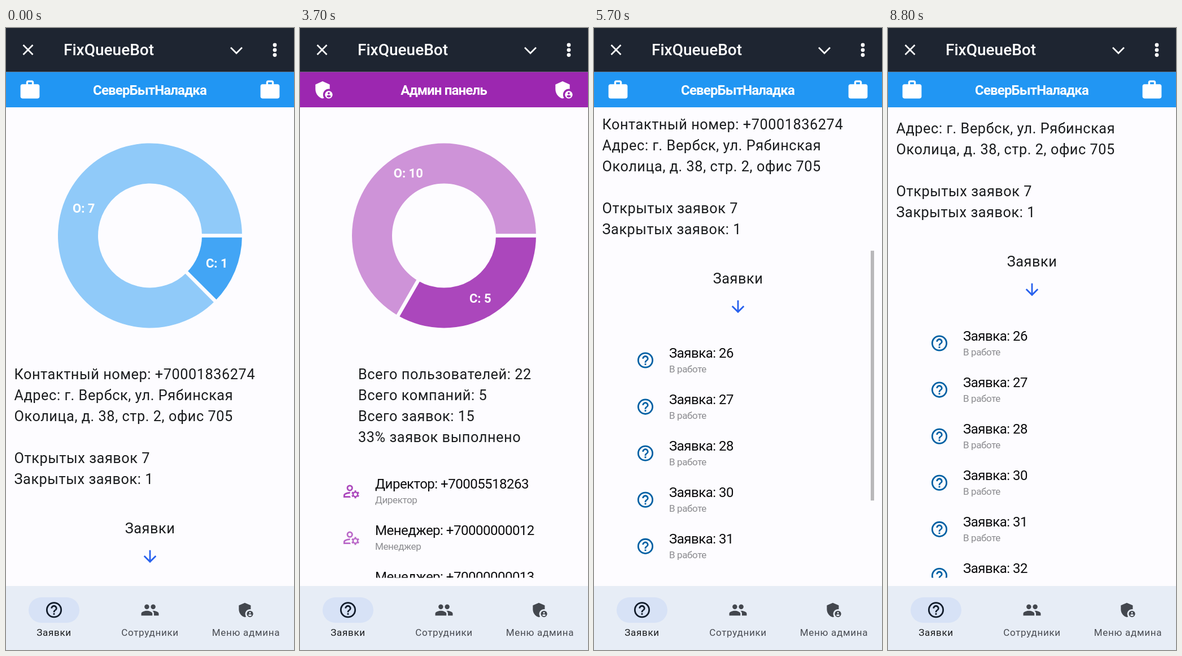
These frames come from a looping animation (510x1098 px, 9.2 s). An HTML page:

```html
<!DOCTYPE html>
<html lang="ru">
<head>
<meta charset="utf-8">
<title>FixQueueBot</title>
<style>
  html, body { margin: 0; height: 100%; overflow: hidden; background: #fdfcff; }
  svg { display: block; }
  #stage { width: 100vw; height: 100vh; }
  text { font-family: Roboto, sans-serif; white-space: pre; }
  .body { font-size: 25.3px; letter-spacing: .55px; fill: #1a1c1e; }
  .title { font-size: 24px; letter-spacing: -.5px; fill: #0c0c0e; }
  .sub { font-size: 17px; letter-spacing: -.38px; fill: #8c8c90; }
  .head { font-size: 24px; font-weight: 600; letter-spacing: -.85px; fill: #fff; }
  .slice { font-size: 22px; font-weight: 600; fill: #fff; }
  .bot { font-size: 28px; font-weight: 500; fill: #fff; }
  .detail { font-size: 22.5px; letter-spacing: .35px; fill: #1f2226; }
  .tab { color: #43474e; }
  .tab text { font-size: 17px; letter-spacing: .7px; fill: #484b52; }
  .tab.on { color: #111c2b; }
  .tab.on text { fill: #1a1c1e; }
  .mid { text-anchor: middle; }
</style>
</head>
<body>
<svg id="stage" viewBox="0 0 510 1098" preserveAspectRatio="none">
  <defs>
    <clipPath id="view"><rect y="154.5" width="510" height="816"/></clipPath>
    <symbol id="work" viewBox="0 0 24 24"><path fill="currentColor" d="M20 6h-4V4c0-1.1-.9-2-2-2h-4c-1.1 0-2 .9-2 2v2H4c-1.1 0-2 .9-2 2v11c0 1.1.9 2 2 2h16c1.1 0 2-.9 2-2V8c0-1.1-.9-2-2-2zm-6 0h-4V4h4z"/></symbol>
    <symbol id="help" viewBox="0 0 24 24">
      <circle cx="12" cy="12" r="9" fill="none" stroke="currentColor" stroke-width="2"/>
      <path fill="currentColor" d="M11 16h2v2h-2zM12 6c-2.2 0-4 1.8-4 4h2c0-1.1.9-2 2-2s2 .9 2 2c0 2-3 1.75-3 5h2c0-2.25 3-2.5 3-5 0-2.2-1.8-4-4-4z"/>
    </symbol>
    <symbol id="people" viewBox="0 0 24 24"><g fill="currentColor">
      <circle cx="8" cy="8" r="3"/><circle cx="16" cy="8" r="3"/>
      <path d="M8 13c-2.33 0-7 1.17-7 3.5V19h14v-2.5c0-2.33-4.67-3.5-7-3.5zM16 13c-.3 0-.6 0-1 .05 1.2.84 2 1.97 2 3.45V19h6v-2.5c0-2.33-4.67-3.5-7-3.5z"/>
    </g></symbol>
    <symbol id="admin" viewBox="0 0 24 24"><path fill="currentColor" fill-rule="evenodd" d="M17 11c.34 0 .67.04 1 .09V6.27L10.5 3 3 6.27v4.91c0 4.54 3.2 8.79 7.5 9.82.55-.13 1.08-.32 1.6-.55C11.4 19.5 11 18.3 11 17c0-3.3 2.7-6 6-6zM17 13a4 4 0 1 0 0 8 4 4 0 0 0 0-8zm0 1.38a1.12 1.12 0 1 1 0 2.24 1.12 1.12 0 0 1 0-2.24zm0 5.37c-.93 0-1.74-.46-2.24-1.17.05-.72 1.5-1.08 2.24-1.08s2.2.36 2.24 1.08c-.5.71-1.3 1.17-2.24 1.17z"/></symbol>
    <symbol id="manager" viewBox="0 0 24 24">
      <g fill="none" stroke="currentColor">
        <circle cx="10" cy="8" r="3" stroke-width="2"/>
        <circle cx="17" cy="16" r="2.9" stroke-width="1.8"/>
        <circle cx="17" cy="16" r="4.2" stroke-width="1.6" pathLength="12" stroke-dasharray="1 1" stroke-dashoffset=".5" transform="rotate(-90 17 16)"/>
      </g>
      <path fill="currentColor" d="M4 18v-.65c0-.34.16-.66.4-.8C6.1 15.5 8 15 10 15h.08c.1-.7.3-1.37.6-1.97L10 13c-2.42 0-4.68.67-6.6 1.82C2.5 15.3 2 16.3 2 17.35V20h9.26c-.42-.6-.75-1.28-.97-2z"/>
    </symbol>
    <symbol id="person" viewBox="0 0 24 24"><g fill="currentColor">
      <circle cx="12" cy="8" r="4"/><path d="M12 14c-2.67 0-8 1.34-8 4v2h16v-2c0-2.66-5.33-4-8-4z"/>
    </g></symbol>
    <symbol id="alarm" viewBox="0 0 24 24">
      <g fill="none" stroke="currentColor" stroke-width="2"><circle cx="12" cy="13" r="8"/><path d="M2.6 6.5l4.6-3.85M21.4 6.5l-4.6-3.85"/></g>
      <path fill="currentColor" d="M12.5 8H11v6l4.75 2.85.75-1.23-4-2.37z"/>
    </symbol>
    <symbol id="down" viewBox="0 0 24 24"><path fill="currentColor" d="M20 12l-1.4-1.4-5.6 5.57V4h-2v12.17l-5.6-5.6L4 12l8 8z"/></symbol>
  </defs>
</svg>
<script>
const LOOP = 9200, STEP = 100;
const stage = document.getElementById('stage');
const BG = '#fdfcff';
const BAND_TOP = 77.5;
const COMPANY = 'СеверБытНаладка';

const text = (cls, x, y, str) => `<text class="${cls}" x="${x}" y="${y}">${str}</text>`;
const lines = (cls, x, y, gap, rows) => rows.map((row, i) => row && text(cls, x, y + i * gap, row)).join('');
const icon = (name, cx, cy, size, color) =>
  `<use href="#${name}" x="${cx - size / 2}" y="${cy - size / 2}" width="${size}" height="${size}"${color ? ` color="${color}"` : ''}/>`;

// Donut slices run clockwise from three o'clock: [weight, color, label or icon]
function donut(slices) {
  const cx = 255, cy = 366.5, outer = 163, inner = 92;
  const total = slices.reduce((sum, s) => sum + s[0], 0);
  const at = (r, a) => [cx + r * Math.cos(a), cy + r * Math.sin(a)];
  let angle = 0, arcs = '', gaps = '', marks = '';
  for (const [weight, color, mark] of slices) {
    const sweep = weight / total * 2 * Math.PI, end = angle + sweep, big = +(sweep > Math.PI);
    arcs += `<path fill="${color}" d="M${at(outer, angle)}A${outer} ${outer} 0 ${big} 1 ${at(outer, end)}L${at(inner, end)}A${inner} ${inner} 0 ${big} 0 ${at(inner, angle)}Z"/>`;
    gaps += `<path stroke="${BG}" stroke-width="6.5" d="M${at(inner - 3, angle)}L${at(outer + 3, angle)}"/>`;
    const [x, y] = at(127.5, angle + sweep / 2);
    marks += mark.includes(':') ? text('slice mid', x + .5, y + 8, mark) : icon(mark, x, y, 50.6, '#fff');
    angle = end;
  }
  return arcs + gaps + marks;
}

// List rows: [icon, color, title, subtitle]
const list = (top, rows) => rows.map(([name, color, title, sub], i) => {
  const y = top + i * 82.1;
  return icon(name, 91, y + 4, 33.75, color) + text('title', 133, y - 1, title) + text('sub', 133, y + 25.2, sub);
}).join('');

const page = (color, mark, title, content) => `<g class="page">
  <rect y="${BAND_TOP}" width="510" height="${140 - BAND_TOP}" fill="${color}"/>
  ${icon(mark, 42.5, 109.3, 40.5, '#fff')}${icon(mark, 467.5, 109.3, 40.5, '#fff')}
  ${text('head mid', 254.5, 118, title)}
  <g clip-path="url(#view)"><g class="content">${content}</g></g></g>`;

const staff = (chief, manager) => [
  ['manager', chief, 'Директор: +70005518263', 'Директор'],
  ['manager', manager, 'Менеджер: +70000000012', 'Менеджер'],
  ['manager', manager, 'Менеджер: +70000000013', 'Менеджер'],
  ['person', manager, 'Сотрудник: +70000000015', 'Сотрудник']
];

const requests = page('#2196f3', 'work', COMPANY,
  donut([[1, '#42a5f5', 'C: 1'], [7, '#90caf9', 'O: 7']]) +
  lines('body', 14.5, 620, 36.9, [
    'Контактный номер: +70001836274', 'Адрес: г. Вербск, ул. Рябинская',
    'Околица, д. 38, стр. 2, офис 705', '', 'Открытых заявок 7', 'Закрытых заявок: 1']) +
  text('body mid', 255, 892.3, 'Заявки') + icon('down', 255, 933, 33.75, '#2962ee') +
  list(1023.5, [26, 27, 28, 30, 31, 32, 33].map(n => ['help', '#0061a4', 'Заявка: ' + n, 'В работе'])));

const employees = page('#ff9800', 'work', COMPANY,
  donut([[3, '#ff5722', 'manager'], [13, '#ff9800', 'person'], [7, '#ffb74d', 'alarm']]) +
  lines('body', 33.5, 620, 36.9, ['В компании сейчас: 16 сотрудников', 'Ожидаем 7 сотрудника']) +
  list(740, staff('#d32f0f', '#fb8c00')));

const adminPanel = page('#9c27b0', 'admin', 'Админ панель',
  donut([[5, '#ab47bc', 'C: 5'], [10, '#ce93d8', 'O: 10']]) +
  lines('body', 103, 620, 36.9, ['Всего пользователей: 22', 'Всего компаний: 5', 'Всего заявок: 15', '33% заявок выполнено']) +
  list(813.7, staff('#ab47bc', '#ba68c8')));

const tabs = [['help', 'Заявки'], ['people', 'Сотрудники'], ['admin', 'Меню админа']].map(([name, label], i) => {
  const x = 85 + i * 170;
  return `<g class="tab">${icon(name, x, 1027.3, 33.75)}${text('mid', x, 1073, label)}</g>`;
}).join('');

const dialog = `<g id="dialog">
  <rect y="${BAND_TOP}" width="510" height="1021" opacity=".54"/>
  <rect x="57" y="227.5" width="396" height="721" rx="39" fill="#dfe7f1" fill-opacity=".94"/>
  ${lines('detail', 91, 285, 29.75, [
    'Детали заявки: #27', '', 'ID пользователя: 200745', 'Организация:', COMPANY,
    'Адрес: г. Вербск, ул.', 'Рябинская Околица, д. 38, стр.', '2, офис 705', '',
    'Сообщение: - Не печатает', 'принтер на втором этаже.', 'Появляется ошибка «Нет',
    'подключения». Необходимо', 'проверить драйвера и', 'соединение.', '',
    'Время создания: 2025-07-03', '05:47:30.113770', 'Статус: В работе'])}</g>`;

const topBar = `<rect width="510" height="${BAND_TOP}" fill="#1e2531"/>
  <g fill="none" stroke="#fff" stroke-width="2.7"><path d="M30.5 30l17 17m0-17l-17 17M398 34.5l10 10 10-10"/></g>
  ${[30, 38.8, 47.6].map(y => `<circle cx="476" cy="${y}" r="3.4" fill="#fff"/>`).join('')}
  ${text('bot', 102, 48, 'FixQueueBot')}`;

stage.insertAdjacentHTML('beforeend', `<rect width="510" height="1098" fill="${BG}"/>
  ${requests}${employees}${adminPanel}
  <rect id="bar" x="490" width="6" height="441"/>
  <rect y="985" width="510" height="113" fill="#e7edf6"/>
  <rect id="pill" y="1005" height="45" fill="#d7e2f6"/>
  ${tabs}${dialog}${topBar}`);

const $ = id => document.getElementById(id);
const pages = [...document.querySelectorAll('.page')];
const tabNodes = [...document.querySelectorAll('.tab')];
const scroller = pages[0].querySelector('.content');

// Tables of [time, value]
const TAB = [[0, 0], [1100, 1], [2200, 2], [3200, 0]];
const PAGE = [[0, 0], [1600, 1], [2700, 2], [4200, 0]];
const SCROLL = [[5000, 0], [5100, 70], [5200, 163], [5300, 250], [5400, 320],
  [5500, 374], [5600, 413], [5700, 441], [5800, 460], [5900, 471]];
const BAR = [[5000, 0], [5100, .15], [5200, .21], [5400, .27], [6100, .27], [6200, 0]];
const DIALOG = [[6900, 0], [7000, .5], [7100, 1], [8000, 1], [8100, .4], [8200, 0]];

const latest = (table, t) => table.filter(([at]) => at <= t).pop();
function lerp(table, t) {
  const i = table.findIndex(([at]) => at > t);
  if (i === 0) return table[0][1];
  if (i < 0) return table[table.length - 1][1];
  const [t0, a] = table[i - 1], [t1, b] = table[i];
  return a + (b - a) * (t - t0) / (t1 - t0);
}

function render(t) {
  const [tapTime, tab] = latest(TAB, t);
  const current = latest(PAGE, t)[1];
  pages.forEach((node, i) => node.style.display = i === current ? '' : 'none');
  tabNodes.forEach((node, i) => node.classList.toggle('on', i === tab));

  const grow = tapTime ? Math.min(1, (t - tapTime + STEP) / 400) : 1;
  const width = 90 * (1 - (1 - grow) ** 3);
  $('pill').setAttribute('x', 85 + tab * 170 - width / 2);
  $('pill').setAttribute('width', width);
  $('pill').setAttribute('rx', Math.min(22.5, width / 2));

  const scroll = lerp(SCROLL, t);
  scroller.setAttribute('transform', `translate(0 ${-scroll})`);
  $('bar').setAttribute('y', 155 + scroll * .54);
  $('bar').setAttribute('opacity', lerp(BAR, t));
  $('dialog').setAttribute('opacity', lerp(DIALOG, t));
}

const start = performance.now();
function tick() {
  const t = (performance.now() - start) % LOOP;
  render(Math.floor(t / STEP) * STEP);
  requestAnimationFrame(tick);
}
tick();
</script>
</body>
</html>
```
